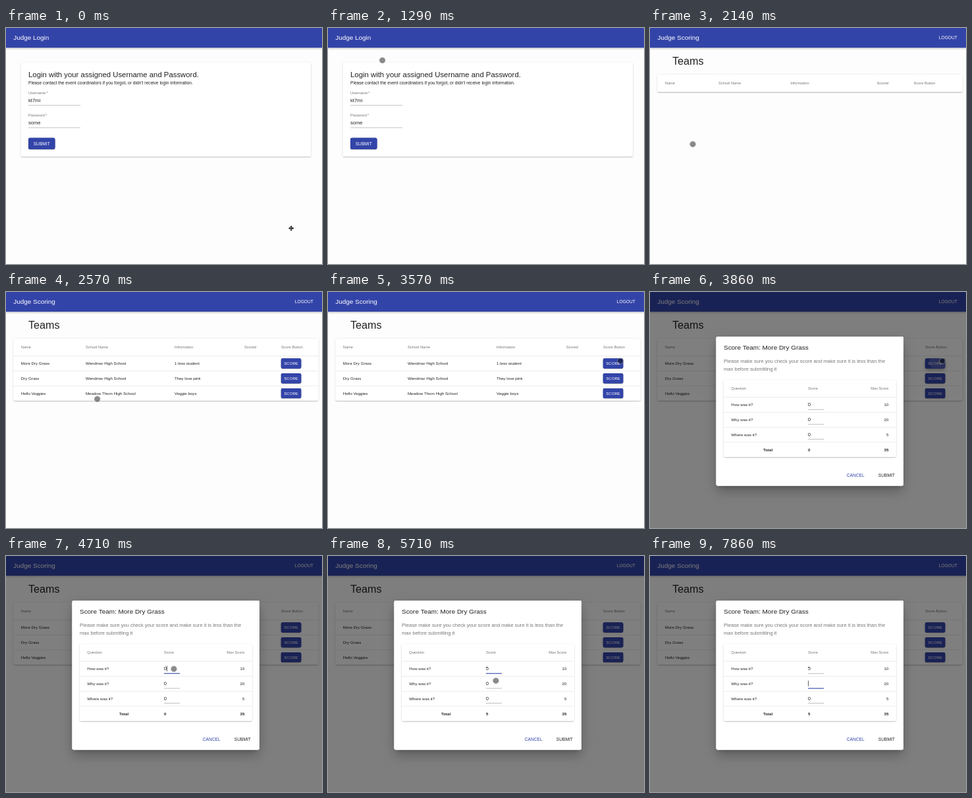
These frames come from a looping animation (480x360 px, 8 s). An HTML page with a canvas:

```html
<!DOCTYPE html>
<html lang="en">
<head>
<meta charset="utf-8">
<title>Judge Scoring</title>
<style>
html, body { margin: 0; width: 100%; height: 100%; overflow: hidden; background: #fdfdfd; }
canvas { display: block; width: 480px; height: 360px; }
</style>
</head>
<body>
<canvas id="stage" width="480" height="360"></canvas>
<script>
const W = 480, H = 360, LOOP = 8000, STEP = 1000 / 7;
const UNIT = 480 / 1013; // stage pixels per page pixel
const BLUE = '#3344a9', INK = 'rgba(0,0,0,.87)', MUTED = 'rgba(0,0,0,.54)', LINE = '#e0e0e0';

const screen = document.getElementById('stage').getContext('2d');
const layerCanvas = document.createElement('canvas');
layerCanvas.width = W;
layerCanvas.height = H;
const layer = layerCanvas.getContext('2d');
let ctx = screen;

// offset y, blur, spread, alpha
const ELEVATION = {
  2: [[1, 5, 0, .2], [2, 2, 0, .14], [3, 1, -2, .12]],
  4: [[2, 4, -1, .2], [4, 5, 0, .14], [1, 10, 0, .12]],
  8: [[5, 5, -3, .2], [8, 10, 1, .14], [3, 14, 2, .12]],
  24: [[11, 15, -7, .2], [24, 38, 3, .14], [9, 46, 8, .12]]
};

const clamp = v => Math.min(1, Math.max(0, v));
const ease = v => v * v * (3 - 2 * v);
const progress = (t, start, length) => clamp((t - start) / length);

function box(x, y, w, h, r) {
  ctx.beginPath();
  ctx.roundRect(x, y, w, h, r);
}

function paper(x, y, w, h, level, color = '#fff', radius = 2) {
  ctx.fillStyle = color;
  for (const [dy, blur, spread, alpha] of ELEVATION[level]) {
    const s = Math.min(0, spread) * UNIT;
    ctx.save();
    ctx.shadowColor = `rgba(0,0,0,${alpha})`;
    ctx.shadowBlur = blur * UNIT;
    ctx.shadowOffsetY = dy * UNIT;
    box(x - s, y - s, w + 2 * s, h + 2 * s, radius);
    ctx.fill();
    ctx.restore();
  }
  box(x, y, w, h, radius);
  ctx.fill();
}

function text(str, x, y, size, color = INK, align = 'left', weight = 400) {
  ctx.font = `${weight} ${size * UNIT}px "Liberation Sans", Arial, sans-serif`;
  ctx.textAlign = align;
  ctx.fillStyle = color;
  ctx.fillText(str, x, y);
}

function rule(x, y, w, color = LINE, h = .6) {
  ctx.fillStyle = color;
  ctx.fillRect(x, y - h / 2, w, h);
}

function button(label, x, y, w, h, size, press, px, py) {
  const pressed = press > 0 && press < 1;
  paper(x, y, w, h, pressed ? 8 : 2, BLUE);
  if (pressed) {
    ctx.save();
    box(x, y, w, h, 2);
    ctx.clip();
    ctx.fillStyle = `rgba(255,255,255,${.3 * (1 - press)})`;
    ctx.beginPath();
    ctx.arc(px, py, 4 + w * press, 0, 7);
    ctx.fill();
    ctx.restore();
  }
  text(label, x + w / 2, y + h / 2 + size * UNIT * .36, size, '#fff', 'center');
}

function header(title, action) {
  paper(0, 0, W, 29.8, 4, BLUE, 0);
  text(title, 11.2, 18, 21, '#fff');
  if (action) text(action, 466.8, 17.2, 14, '#fff', 'right');
}

function loginField(label, value, y) {
  text(label + '\u2009*', 34, y, 12, MUTED);
  text(value, 34, y + 11.8, 16);
  rule(34, y + 16.6, 79, 'rgba(0,0,0,.42)');
}

function loginPage(t) {
  paper(22.7, 52.7, 440.3, 143.5, 2);
  text('Login with your assigned Username and Password.', 34, 75, 24);
  text("Please contact the event coordinators if you forgot, or didn't receive login information.", 34, 86, 14);
  loginField('Username', 'kt7mi', 101.4);
  loginField('Password', 'some', 135.4);
  button('SUBMIT', 34.1, 167.7, 40.2, 17, 14, progress(t, 1800, 500), 65, 177);
  header('Judge Login');
}

const TEAMS = [
  ['More Dry Grass', 'Wendmar High School', '1 less student'],
  ['Dry Grass', 'Wendmar High School', 'They love pink'],
  ['Hello Veggies', 'Meadow Thorn High School', 'Veggie boys']
];

function teamsPage(t) {
  const loaded = t > 2250;
  const columns = loaded ? [22.8, 121, 256, 362, 418] : [22.8, 104, 213.3, 344.5, 400.5];
  text('Teams', 34, 56, 34);
  paper(11.3, 71, 463.2, loaded ? 94.8 : 26.8, 2);
  ['Name', 'School Name', 'Information', 'Scored', 'Score Button']
    .forEach((label, i) => text(label, columns[i], 86.4, 12, MUTED));
  rule(11.3, 97.6, 463.2);
  if (loaded) {
    TEAMS.forEach((team, row) => {
      const y = 109 + row * 22.75;
      team.forEach((cell, i) => text(cell, columns[i], y + 2.3, 13));
      if (row < 2) rule(11.3, y + 11.4, 463.2);
      button('SCORE', 417.9, y - 7.4, 30.3, 15, 13, row ? 0 : progress(t, 3600, 500), 444, 105);
    });
  }
  header('Judge Scoring', 'LOGOUT');
}

function scoreField(value, y, focused, caret) {
  text(value, 239.8, y + 2.4, 16);
  if (caret) {
    const x = 240 + ctx.measureText(value).width;
    ctx.fillStyle = '#222';
    ctx.fillRect(x, y - 4.6, .7, 8.6);
  }
  rule(240, y + 7.2, 24, focused ? BLUE : 'rgba(0,0,0,.42)', focused ? 1.1 : .6);
}

const within = (t, a, b) => t >= a && t < b;

function dialog(t) {
  const first = t < 4820 ? '0' : t < 4970 ? '' : '5';
  const second = t < 6100 ? '0' : '';
  const fields = [
    [first, within(t, 4400, 5830), within(t, 4400, 5250)],
    [second, t > 5830, within(t, 5830, 6400) || within(t, 6980, 7400) || t > 7840],
    ['0', false, false]
  ];
  paper(100.6, 68, 284.2, 227.4, 24);
  text('Score Team: More Dry Grass', 112, 88.3, 21);
  text('Please make sure you check your score and make sure it is less than the', 112, 108.4, 16, MUTED);
  text('max before submitting it', 112, 119.7, 16, MUTED);

  paper(112, 134.2, 261.7, 117.6, 2);
  text('Question', 123.3, 149.4, 12, MUTED);
  text('Score', 240, 149.4, 12, MUTED);
  text('Max Score', 362.4, 149.4, 12, MUTED, 'right');
  rule(112, 160.7, 261.7);
  [['How was it?', 10], ['Why was it?', 20], ['Where was it?', 5]].forEach(([question, max], i) => {
    const y = 172 + i * 22.75;
    text(question, 123.3, y + 2.3, 13);
    scoreField(fields[i][0], y, fields[i][1], fields[i][2]);
    text(max, 362.4, y + 2.3, 13, INK, 'right');
    rule(112, y + 11.5, 261.7);
  });
  text('Total', 172, 242.6, 13, INK, 'left', 700);
  text(first || '0', 240, 242.6, 13, INK, 'left', 700);
  text('35', 362.4, 242.6, 13, INK, 'right', 700);
  text('CANCEL', 298.8, 281.9, 14, BLUE);
  text('SUBMIT', 346.8, 281.9, 14);
}

function openDialog(t) {
  const shown = ease(progress(t, 3654, 200));
  if (!shown) return;
  ctx.fillStyle = `rgba(0,0,0,${.5 * shown})`;
  ctx.fillRect(0, 0, W, H);
  layer.clearRect(0, 0, W, H);
  ctx = layer;
  dialog(t);
  ctx = screen;
  ctx.globalAlpha = shown;
  ctx.drawImage(layerCanvas, 0, 0);
  ctx.globalAlpha = 1;
}

// time, x, y
const PATH = [
  [0, 433, 305], [430, 150, 150], [714, 34, 21], [860, 34, 21], [1140, 21, 17],
  [1428, 142, 80], [1857, 65, 177], [2290, 65, 177], [3286, 444, 105],
  [4000, 444, 105], [4280, 255, 172], [5430, 255, 172], [5710, 255, 190], [LOOP, 255, 190]
];

function pointerAt(t) {
  const i = PATH.findIndex(p => p[0] > t);
  const [t0, x0, y0] = PATH[i - 1], [t1, x1, y1] = PATH[i];
  const k = ease((t - t0) / (t1 - t0));
  return [x0 + (x1 - x0) * k, y0 + (y1 - y0) * k];
}

function moveCursor(x, y) {
  ctx.save();
  ctx.translate(x + .2, y + .4);
  ctx.fillStyle = '#000';
  for (let i = 0; i < 4; i++) {
    ctx.fillRect(-.55, -3, 1.1, 3.4);
    ctx.beginPath();
    ctx.moveTo(0, -4);
    ctx.lineTo(1.8, -2);
    ctx.lineTo(-1.8, -2);
    ctx.fill();
    ctx.rotate(Math.PI / 2);
  }
  ctx.restore();
}

function pointer(t) {
  const [x, y] = pointerAt(t);
  if (t < 200) return moveCursor(x, y);
  ctx.globalAlpha = clamp((7857 - t) / 429);
  ctx.beginPath();
  ctx.arc(x, y + .2, 4.3, 0, 7);
  ctx.fillStyle = 'rgba(0,0,0,.46)';
  ctx.fill();
  ctx.strokeStyle = 'rgba(160,160,160,.8)';
  ctx.lineWidth = .8;
  ctx.stroke();
  ctx.globalAlpha = 1;
}

function draw(now) {
  const t = Math.floor((now % LOOP + 5) / STEP) % 56 * STEP;
  ctx.fillStyle = '#fdfdfd';
  ctx.fillRect(0, 0, W, H);
  if (t < 2100) loginPage(t);
  else teamsPage(t);
  openDialog(t);
  pointer(t);
}

const start = performance.now();
function tick() {
  draw(performance.now() - start);
  requestAnimationFrame(tick);
}
tick();
</script>
</body>
</html>
```
